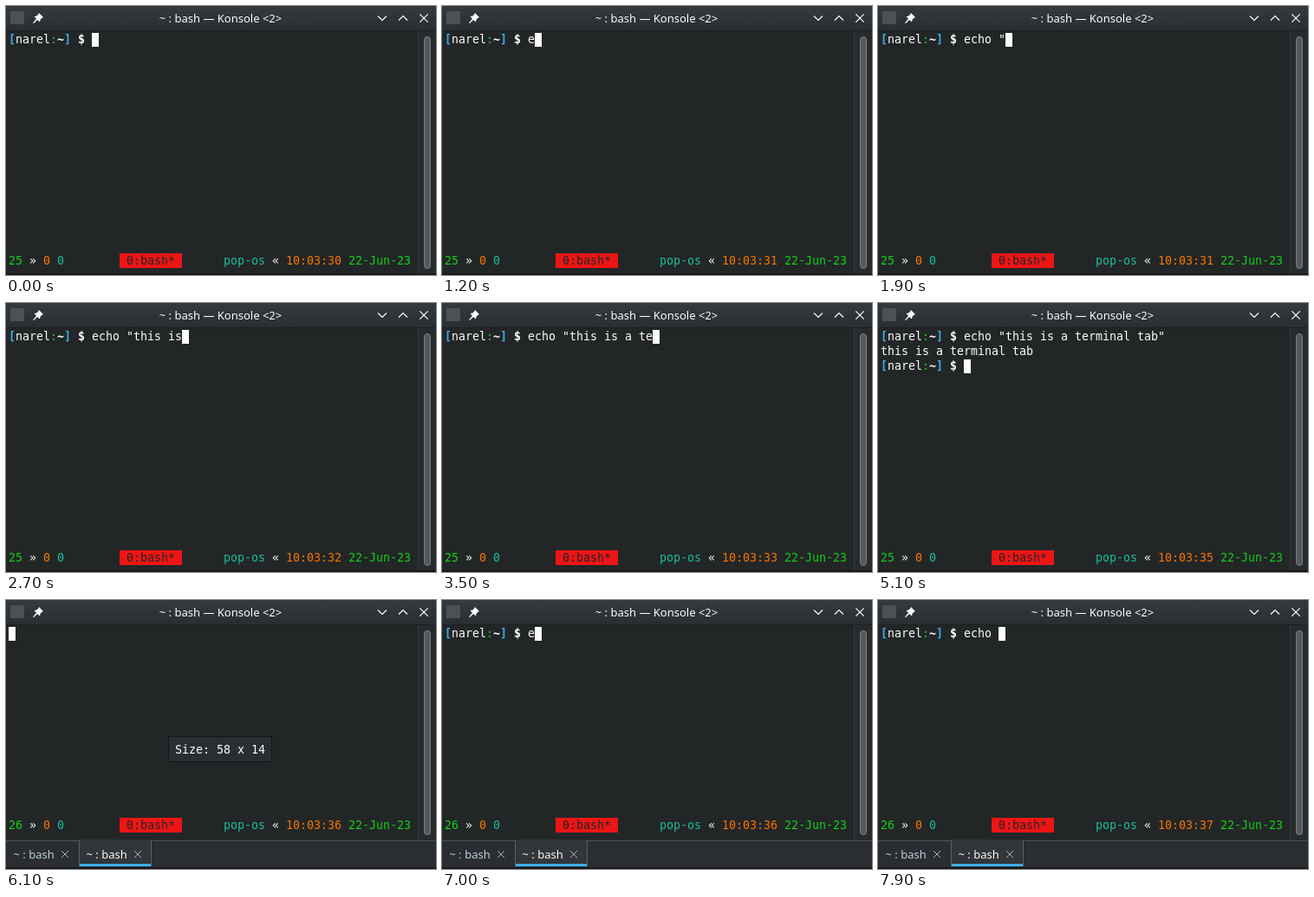
Recreate the animation shown at these times as an HTML page with a canvas. Size 496 by 310 pixels, loop 8 s.

```html
<!DOCTYPE html>
<html lang="en">
<head>
<meta charset="utf-8">
<title>Terminal tabs</title>
<style>
html, body { margin: 0; width: 100%; height: 100%; overflow: hidden; background: #232627; }
canvas { display: block; width: 496px; height: 310px; }
</style>
</head>
<body>
<canvas id="stage" width="496" height="310"></canvas>
<script>
const ctx = document.getElementById('stage').getContext('2d');
const LOOP = 8000, CELL = 8, ROW = 17, LEFT = 3, TOP = 30;
const MONO = '13.29px "DejaVu Sans Mono", monospace';
const SANS = '13px "Noto Sans", sans-serif';
const WHITE = '#fcfcfc', BACK = '#232627', BLUE = '#3daee9', GREEN = '#11d116',
      ORANGE = '#f67400', TEAL = '#1abc9c', RED = '#ed1515';

const NEW_TAB = 6000, NEW_SHELL = 6100, NEW_PROMPT = 6300, HINT_END = 7000,
      NEW_TICK = 7100, ENTER = 5100;

// Each run types one "|"-separated piece every 100 ms.
const firstKeys = [[1200, 'e|c|ho| '], [1900, '"||t|h|i|s| |i|s| |a| '],
  [3500, 'te|r|m|i|n|al| |t|a'], [4500, 'b'], [4800, '"']];
const secondKeys = [[6900, 'e|||c'], [7700, 'ho|| ']];

const typed = (runs, t) => runs.map(([start, keys]) =>
  keys.split('|').filter((_, i) => t >= start + i * 100).join('')).join('');

function box(x, y, w, h, color) {
  ctx.fillStyle = color;
  ctx.fillRect(x, y, w, h);
}

function label(text, x, y, color, font = SANS) {
  ctx.font = font;
  ctx.fillStyle = color;
  ctx.fillText(text, x, y);
}

function line(color, width, ...points) {
  ctx.strokeStyle = color;
  ctx.lineWidth = width;
  ctx.beginPath();
  for (const [x, y] of points) ctx.lineTo(x, y);
  ctx.stroke();
}

function cross(x, y, r, color, width) {
  line(color, width, [x - r, y - r], [x + r, y + r]);
  line(color, width, [x + r, y - r], [x - r, y + r]);
}

function cells(text, col, row, color = WHITE, bold = false) {
  label(text, LEFT + col * CELL, TOP + row * ROW + 13, color, (bold ? 'bold ' : '') + MONO);
}

function cursor(col, row) {
  box(LEFT + col * CELL, TOP + row * ROW + 1, CELL, 16, WHITE);
}

function prompt(row, command, active = true) {
  cells('[', 0, row, BLUE, true);
  cells('narel', 1, row);
  cells(':', 6, row, GREEN);
  cells('~', 7, row, WHITE, true);
  cells(']', 8, row, BLUE, true);
  cells('$', 10, row, WHITE, true);
  cells(command, 12, row);
  if (active) cursor(12 + command.length, row);
}

function statusLine(row, session, seconds) {
  cells(session, 0, row, GREEN);
  cells('»', 3, row);
  cells('0', 5, row, ORANGE);
  cells('0', 7, row, TEAL);
  box(LEFT + 16 * CELL, TOP + row * ROW, 9 * CELL, ROW, RED);
  cells('0:bash*', 17, row, BACK);
  cells('pop-os', 31, row, TEAL);
  cells('«', 38, row);
  cells('10:03:' + seconds, 40, row, ORANGE);
  cells('22-Jun-23', 49, row, GREEN);
}

function titleBar() {
  const shade = ctx.createLinearGradient(0, 0, 0, 28);
  shade.addColorStop(0, '#343a3f');
  shade.addColorStop(1, '#2a2e32');
  box(0, 0, 496, 28, shade);
  box(0, 28, 496, 1, '#1d2022');
  box(5, 6, 16, 15, '#4b5154');

  // Push pin
  ctx.fillStyle = WHITE;
  ctx.beginPath();
  for (const [x, y] of [[38, 8], [43, 13], [41.5, 13.8], [39.5, 15.8], [39, 18.5],
    [36.2, 16], [32, 20], [31, 19.5], [35, 14.8], [32.5, 12], [35.5, 11.5], [37.3, 9.5]]) {
    ctx.lineTo(x, y);
  }
  ctx.fill();

  ctx.textAlign = 'center';
  label('~ : bash — Konsole <2>', 247.5, 19, WHITE);
  ctx.textAlign = 'left';
  line(WHITE, 1.2, [429, 11.5], [434, 16.5], [439, 11.5]);
  line(WHITE, 1.2, [453, 16.5], [458, 11.5], [463, 16.5]);
  cross(482, 14, 4.7, WHITE, 1.2);
}

function scrollBar(bottom) {
  box(475, 29, 21, bottom - 29, '#272b2e');
  box(475, 29, 1, bottom - 29, '#34393c');
  ctx.beginPath();
  ctx.roundRect(482.5, 35.5, 7, bottom - 41, 3.5);
  ctx.fillStyle = '#55595b';
  ctx.fill();
  ctx.strokeStyle = '#7b7e80';
  ctx.lineWidth = 1;
  ctx.stroke();
}

function tabBar() {
  box(0, 276, 496, 32, '#2a2e32');
  box(0, 277, 496, 1, '#4b5053');
  box(84, 276, 84, 31, '#31363b');
  line('#5a5f62', 1, [84.5, 277], [84.5, 306.5], [167.5, 306.5], [167.5, 277]);
  box(85, 304, 82, 3, BLUE);
  label('~ : bash', 8.5, 298, '#b9cfdd');
  label('~ : bash', 92.5, 298, WHITE);
  cross(68, 293, 4, '#a9adaf', 1);
  cross(152, 293, 4, '#a9adaf', 1);
}

function sizeHint() {
  box(187, 157, 120, 30, '#131517');
  box(188, 158, 118, 28, '#2a2e32');
  label('Size: 58 x 14', 195, 177, WHITE, MONO);
}

function firstTab(t) {
  prompt(0, 'echo'.slice(0, 0) + typed(firstKeys, t), t < ENTER);
  if (t >= ENTER) {
    cells('this is a terminal tab', 0, 1);
    prompt(2, '');
  }
  statusLine(15, '25', 30 + Math.floor(t / 1000));
}

function secondTab(t) {
  if (t < NEW_PROMPT) cursor(0, 0);
  else prompt(0, typed(secondKeys, t));
  if (t >= NEW_SHELL) statusLine(13, '26', t < NEW_TICK ? 36 : 37);
  tabBar();
  if (t < HINT_END) sizeHint();
}

function draw(t) {
  const tabbed = t >= NEW_TAB;
  box(0, 0, 496, 310, BACK);
  titleBar();
  scrollBar(tabbed ? 276 : 308);
  (tabbed ? secondTab : firstTab)(t);
  box(0, 308, 496, 2, '#17191b');
}

const begin = performance.now();
function frame() {
  draw((performance.now() - begin) % LOOP);
  requestAnimationFrame(frame);
}
frame();
</script>
</body>
</html>
```
